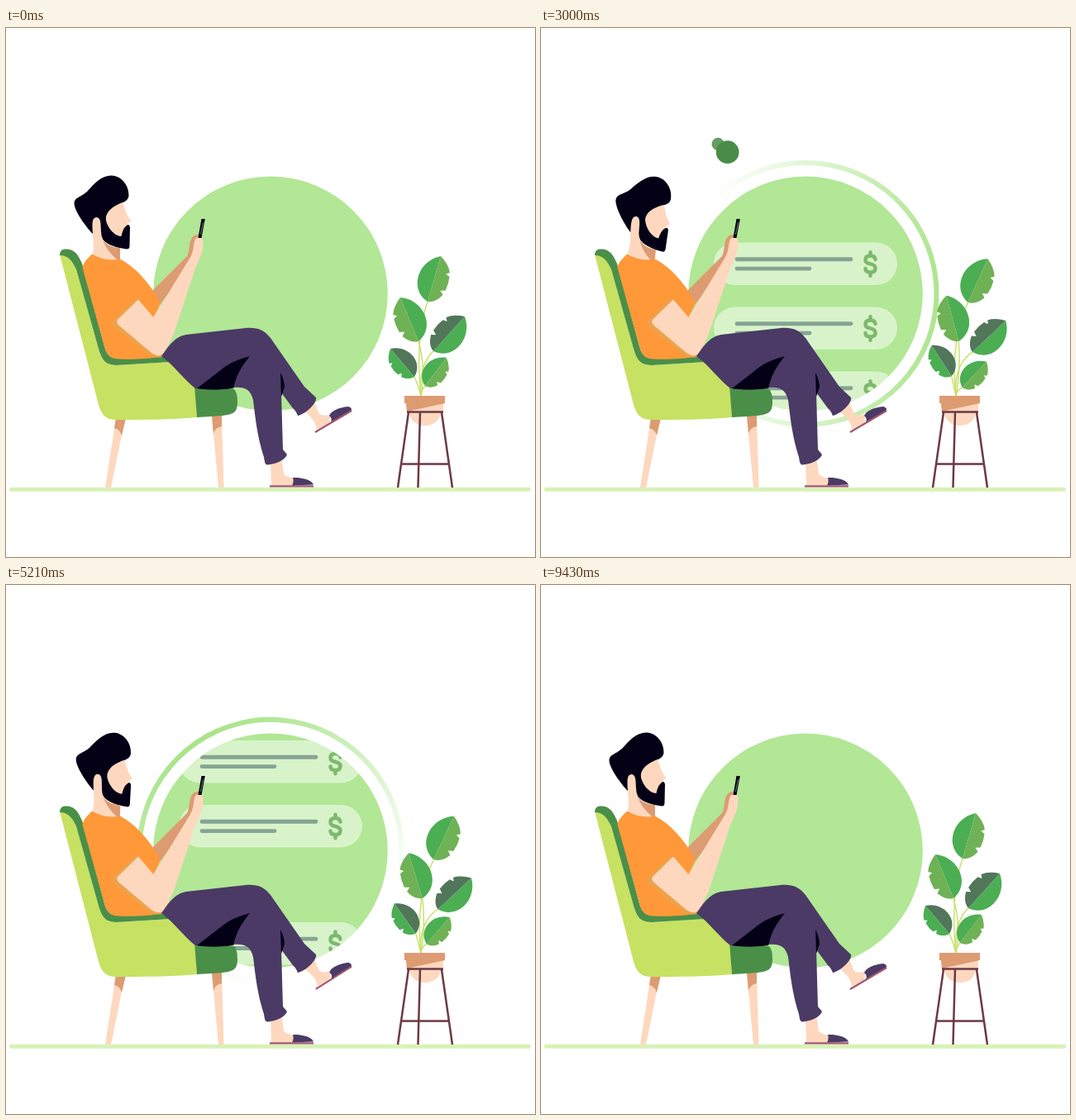
Recreate the animation shown at these times as an HTML page. Size 640 px wide and 640 px high, loop 9570 ms.

```html
<!DOCTYPE html>
<html lang="en">
<head>
<meta charset="utf-8">
<title>Reading in a chair</title>
<style>
html, body { margin: 0; height: 100%; overflow: hidden; background: #fff; }
svg { display: block; width: 100%; height: 100%; }
.skin { fill: #fdd8be; }
.tan { fill: #dd9b72; }
.ink { fill: #040016; }
.lime { fill: #c7e163; }
.green { fill: #4a8c47; }
.cloth { fill: #4a3a65; }
.sole { stroke: #a2566f; stroke-width: 2.2; }
.stand { stroke: #6b3a45; stroke-width: 2.5; fill: none; }
.stem { stroke: #c5e063; stroke-width: 1.4; fill: none; }
</style>
</head>
<body>
<svg viewBox="0 0 640 640">
  <defs>
    <linearGradient id="fade">
      <stop offset="0" stop-color="#a9e48b"/>
      <stop offset=".88" stop-color="#b1e795" stop-opacity="0"/>
    </linearGradient>
    <clipPath id="window"><circle class="disc" cx="320" cy="321.4"/></clipPath>
    <g id="card">
      <rect x="209" width="222" height="51.5" rx="25.7" fill="#fff"/>
      <path d="M237 20.3H375M237 31.6H325" stroke="#5c6391" stroke-width="4.8" stroke-linecap="round"/>
      <path transform="translate(398.5 26)" fill="none" stroke="#4a8c47" stroke-width="4.5" stroke-linecap="round"
        d="M6 -5.5C5.5 -9 3 -10 0 -10C-4 -10 -6 -8 -6 -5C-6 -1.5 -3.5 -.8 0 0C3.5 .8 6 1.8 6 5.2C6 8.5 3.5 10 0 10C-4 10 -6 8.5 -6 5.5M0 -10V-14.3M0 10V14.3"/>
    </g>
  </defs>

  <circle id="pulse" cx="320" cy="321.4" fill="#b1e795"/>
  <circle id="ring" cx="320" cy="321.4" fill="none" stroke="url(#fade)" stroke-width="6"/>
  <circle class="disc" cx="320" cy="321.4" fill="#b1e795"/>
  <circle class="disc" id="dark" cx="320" cy="321.4" fill="#5fb74c"/>
  <g id="cards" clip-path="url(#window)"></g>
  <g id="dots" class="green"><circle/><circle/><circle/></g>

  <rect x="4" y="555.7" width="631" height="5" rx="2" fill="#d8f2b6"/>

  <g id="chair">
    <path class="skin" d="M133 472H145L140 492L127 556H120ZM249 469H261L263.500 556H257Z"/>
    <path class="tan" d="M133 472H145L140 493C138 487 135 485 131 484ZM249 469H261V482C255 483 252 487 251 491Z"/>
    <path class="lime" d="M65 274C70 275 78 274 85 292L112 388C117 405 122 407 133 408L198 404L229 432L231 471C200 474 160 474 132 474C120 473 115 468 111 452Z"/>
    <path fill="#4a8f48" d="M65 275C65 268 70 267 74 267.500C84 268 88 276 92 285L119 385C122 396 126 400 138 400L188 397L199 404L133 408C122 407 117 405 112 388L85 292C78 276 70 275 65 275ZM228 432L276 437Q280 441 280 452C280 464 277 467 262 469L231 471Z"/>
  </g>

  <g id="man">
    <path class="tan" d="M174 321L219 276C223 270 220 258 227 251.500L234 249L232 275L185 336Z"/>
    <g id="head">
      <path class="ink" d="M105 249C99 243 84 224 82.500 213C82 205 90 205 98 198C107 188 116 178 128 178.500C140 179 149 191 148.500 203C148 209 142 211 137 213L124 230L118 250Z"/>
      <path class="skin" d="M120.500 232C121 222 128 216 141 211L144 219Q146 227 151 232.500Q151 235 147.500 236L146 241L139 254C130 253 121 245 120.500 232Z"/>
      <path class="ink" d="M113 234L115 252C118 260 128 265 146 267.500Q149.500 267.500 149.500 264L150 241Q149 236.500 146 239C142 242 141 246 139.500 252C131 252 121 240 120.500 229Z"/>
      <path class="skin" d="M105 249C104 236 104 229 110 229C115 230 114.500 237 115 246Q115 253 119 259C124 264 130 266 138 266V290H104L106 262Z"/>
      <path class="tan" d="M117 257C122 263 130 265.500 138 266V283C130 277 122 269 117 257Z"/>
    </g>
    <path fill="#ff9839" d="M104 273.500C115 280 127 282 138 279.500C155 288 172 306 187 332L179 350L192 397C170 401 150 401 137 400.500C126 400 122 396 119 385L92.500 290C93 284 99 279 104 273.500Z"/>
    <path fill="#eba34c" d="M157 327L161 330L136 354L180 393L190 397C184 400 179 398 174 396L131 362C127 359 127 356 130 353Z"/>
    <path class="skin" d="M160 328.500L178.500 350L222 279C228 270 226 262 229 255.500C231 252 238 252 238.500 258L238 268C236 277 231 285 228 294L203 370L193 391C189 398 182 397 176 393L138 361C133 357 133 354 138 350Z"/>
    <path class="ink" d="M236.500 231H240.800L236.500 254H232.500Z"/>
    <path d="M238.700 235L235.300 250" stroke="#5a5560" stroke-width="1.400"/>
    <g id="foot">
      <path class="skin" d="M360 463L373 453L379 467C385 470 388 468 393 468L391 478L376 486C375 475 368 470 360 463Z"/>
      <path class="cloth" d="M391 469C393 464 402 459 414 458C418 459 419 462 417 463.500L392 478.500C395 474 394 472 391 469Z"/>
      <path class="sole" d="M374 489L418 463"/>
    </g>
    <path class="skin" d="M320 524H334L336 540C340 543 344 545 348 544V553.500H321Z"/>
    <path class="cloth" d="M347 544C356 543.500 370 546 372 552.500L346 553.500C348 550 348 547 347 544Z"/>
    <path class="sole" d="M319 554.400H372"/>
    <path class="cloth" d="M188 397C195 388 202 374 218 371L290 363C304 362 312 365 320 375L361 434L375 447C377 454 361 468 353 469C351 464 350 463 347 460L333 441L335 510L340 516C338 523 325 528 316 528.500C312 528 313 520 311 516C303 490 301 465 299 450C296 437 288 434 276 435C260 439 240 437 229 436C215 425 204 409 188 397Z"/>
    <path class="ink" d="M231 436L262 412C272 404 284 400 295 397C288 406 279 417 275 436C260 438 245 438 231 436ZM332 417C335 422 337 430 337 434L333 446Z"/>
  </g>

  <g id="plant"></g>
  <path class="skin" d="M484 454H529V464H526C526 474 518 481 507 481C496 481 488 474 488 464H485Z"/>
  <path class="tan" d="M482 445H531V454L485 464L484 454H482Z"/>
  <path class="stand" d="M485 464.500H529M487 465L474 556M501 465L498.500 556M527 465L540 556M478 527.500H536"/>
</svg>
<script>
const LOOP = 9570;
const $ = id => document.getElementById(id);
const NS = 'http://www.w3.org/2000/svg';
const smooth = u => u * u * (3 - 2 * u);
const linear = u => u;
const mix = (a, b, u) => a + (b - a) * u;

// keys: time, value, time, value, ...
function tween(t, keys, ease = smooth) {
  if (t <= keys[0]) return keys[1];
  for (let i = 2; i < keys.length; i += 2)
    if (t < keys[i])
      return mix(keys[i - 1], keys[i + 1], ease((t - keys[i - 2]) / (keys[i] - keys[i - 2])));
  return keys[keys.length - 1];
}

function add(parent, tag, attrs) {
  const el = parent.appendChild(document.createElementNS(NS, tag));
  set(el, attrs);
  return el;
}
function set(el, attrs) {
  for (const name in attrs) el.setAttribute(name, attrs[name]);
}

// Leaves: base and tip at rest, base and tip bent, stem control point
const BRIGHT = '#4bae52', LIGHT = '#6fb155', DULL = '#52765a';
const SMOOTH_HALF = 'M0 0C-26 -8 -25 -44 0 -57Z';
const TOOTHED_HALF = 'M0 0C7 -1 12 -6 15.500 -13L11 -17L17 -19Q18.500 -28 17 -36L12 -38L16 -41Q12 -50 0 -57Z';
const swayHigh = [0, 0, 2030, 1, 4130, 0, 5900, .93, 9430, 0];
const swayMid = [0, 0, 2700, .85, 4000, .42, 7300, 1, 9430, 0];
const swayLow = [0, 0, 2030, 1, 2300, 1, 4150, 0, 6500, 1, 6900, 1, 9430, 0];
const leaves = [
  { rest: [510, 331, 526, 276], bent: [522, 333, 552, 282], ctrl: [495, 375], side: 1, plain: BRIGHT, cut: LIGHT, sway: swayHigh },
  { rest: [499, 379, 477, 326], bent: [507, 379, 494, 323], ctrl: [508, 410], side: -1, plain: BRIGHT, cut: LIGHT, sway: swayMid },
  { rest: [517, 391, 555, 349], bent: [526, 393, 568, 358], ctrl: [499, 407], side: -1, plain: BRIGHT, cut: DULL, sway: swayHigh },
  { rest: [494, 422, 465, 388], bent: [498, 421, 476, 382], ctrl: [500, 435], side: -1, plain: DULL, cut: BRIGHT, sway: swayLow },
  { rest: [507, 433, 533, 399], bent: [511, 436, 542, 406], ctrl: [502, 438], side: 1, plain: BRIGHT, cut: LIGHT, sway: swayLow }
];
for (const leaf of leaves) leaf.stem = add($('plant'), 'path', { class: 'stem' });
for (const leaf of leaves) {
  leaf.blade = add($('plant'), 'g', {});
  add(leaf.blade, 'path', { d: SMOOTH_HALF, fill: leaf.plain });
  add(leaf.blade, 'path', { d: TOOTHED_HALF, fill: leaf.cut });
}

const cards = [0, 1, 2, 3].map(() => add($('cards'), 'use', { href: '#card' }));
const discs = document.querySelectorAll('.disc');
const dots = [
  { start: 900, end: 3080, from: [240, 224, 3], to: [214, 140, 7.6] },
  { start: 1460, end: 3410, from: [242.5, 222, 5], to: [223.5, 141, 15] },
  { start: 6650, end: 8600, from: [242.5, 222, 5], to: [223.5, 141, 15] }
];

function drawPlant(t) {
  for (const { rest, bent, ctrl, side, sway, stem, blade } of leaves) {
    const s = tween(t, sway);
    const [x, y, tx, ty] = rest.map((v, i) => mix(v, bent[i], s));
    const angle = Math.atan2(tx - x, y - ty) * 180 / Math.PI;
    const size = Math.hypot(tx - x, ty - y) / 57;
    set(stem, { d: `M502 446Q${ctrl} ${x} ${y}` });
    set(blade, { transform: `translate(${x} ${y}) rotate(${angle}) scale(${size * side} ${size})` });
  }
}

function drawDots(t) {
  dots.forEach(({ start, end, from, to }, i) => {
    const u = smooth(Math.min(1, Math.max(0, (t - start) / (end - start))));
    const [cx, cy, r] = from.map((v, k) => mix(v, to[k], u));
    set($('dots').children[i], {
      cx, cy, r: r * tween(t, [start - 90, 0, start + 30, 1]),
      opacity: tween(t, [end - 150, 1, end + 340, 0], linear)
    });
  });
}

function drawCards(t) {
  const first = tween(t, [1000, 475, 2360, 323, 3570, 203, 5210, 110, 6200, 65.5], linear);
  const last = tween(t, [4700, 480, 5210, 408, 6300, 297], linear);
  const others = tween(t, [6250, .5, 7720, 0], linear);
  const chosen = tween(t, [6700, .5, 7450, 1, 8100, 1, 9000, 0]);
  cards.forEach((card, i) => set(card, {
    y: i < 3 ? first + 78 * i : last,
    opacity: i < 3 ? others : chosen
  }));
}

function draw(t) {
  const r = tween(t, [3100, 141.8, 3580, 125, 4100, 141.8]);
  discs.forEach(disc => set(disc, { r }));
  set($('dark'), { opacity: tween(t, [6150, 0, 6950, 1, 8200, 1, 9430, 0]) });
  set($('pulse'), {
    r: tween(t, [6200, 140, 7800, 191]),
    opacity: tween(t, [6200, 0, 6300, .42, 6800, .4, 7570, .17, 8000, 0], linear)
  });
  const spin = tween(t, [0, -590, 2360, 15, 3570, 335, 5210, 775, 6710, 1120, 7100, 1210], linear);
  set($('ring'), {
    r: tween(t, [150, 138, 900, 158.5, 6500, 158.5, 7100, 138]),
    transform: `rotate(${spin} 320 321.4)`,
    opacity: tween(t, [2800, 1, 3570, .7, 4400, 1])
  });
  drawCards(t);
  drawDots(t);

  const nod = t < 7070
    ? tween(t, [0, 0, 1800, 7, 3050, 7, 4550, 0, 4750, 0, 6060, 7])
    : tween(t, [7070, 7, 9430, 0], u => u ** 1.4);
  set($('head'), { transform: `rotate(${nod} 121 275)` });
  const tap = tween(t, [0, 0, 1000, -1.5, 2000, 0, 3600, 0, 5200, -1.5, 6700, -1.5, 7500, 0]);
  set($('foot'), { transform: `rotate(${tap} 368 460)` });
  drawPlant(t);
}

function frame() {
  draw(performance.now() % LOOP);
  requestAnimationFrame(frame);
}
frame();
</script>
</body>
</html>
```
